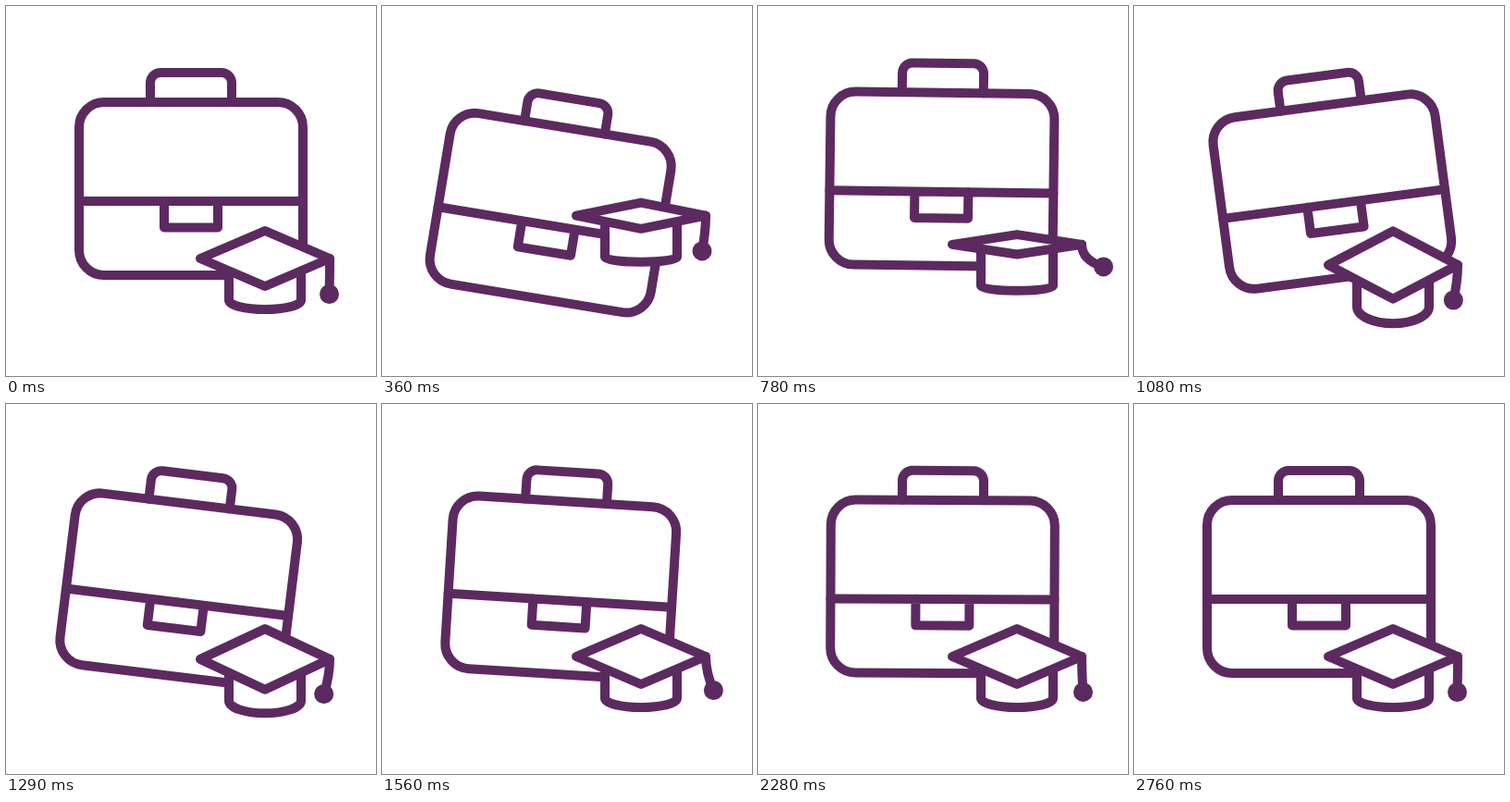
An HTML page for the animation above (4820 ms loop, 400 by 400 pixels).

```html
<!DOCTYPE html>
<html lang="en">
<head>
<meta charset="utf-8">
<title>Briefcase and graduation cap</title>
<style>
  html, body { margin: 0; width: 100%; height: 100%; overflow: hidden; background: #fff; }
  svg { display: block; width: 100vw; height: 100vh; }
  .lines { fill: none; stroke: #5c2a60; stroke-width: 10; stroke-linecap: round; stroke-linejoin: round; }
  .solid { fill: #fff; }
  .bead { fill: #5c2a60; stroke: none; }
</style>
</head>
<body>
<svg viewBox="0 0 400 400">
  <g class="lines">
    <g id="briefcase">
      <rect x="79" y="104" width="242" height="187" rx="27"/>
      <path d="M156 104V83a11 11 0 0 1 11-11h66a11 11 0 0 1 11 11v21M79 211H321M171 211v28.500h58V211"/>
    </g>
    <path id="base" class="solid"/>
    <path id="tassel"/>
    <path id="board" class="solid"/>
    <circle id="bead" class="bead" r="10.500"/>
  </g>
</svg>
<script>
const LOOP = 4820, STEP = 30;

// Each track is a list of [time in ms, value], eased between turning points.
const tracks = {
  caseAngle: [[0, 0], [530, 12.2], [1010, -9.3], [1350, 8.3], [1800, -2.3], [2200, 0.3], [2500, 0]],
  caseDrop: [[0, 0], [420, 29], [890, -16], [1110, 5], [1350, 4], [1700, 0]],
  capDrop: [[0, 0], [390, -47], [1090, 7], [1450, 0]],
  capTilt: [[0, 30], [640, 3.4], [1090, 36.7], [1450, 30]],
  swing: [[0, 0], [320, -4], [780, 24], [1180, -9], [1580, 9], [1980, -3], [2300, 2], [2560, -0.7], [2760, 0]]
};

function valueAt(track, time) {
  const next = track.findIndex(([at]) => at > time);
  if (next < 0) return track[track.length - 1][1];
  const [t0, v0] = track[next - 1], [t1, v1] = track[next];
  return v0 + (v1 - v0) * (1 - Math.cos(Math.PI * (time - t0) / (t1 - t0))) / 2;
}

const set = (id, attributes) => {
  const element = document.getElementById(id);
  for (const name in attributes) element.setAttribute(name, attributes[name]);
};

function draw(time) {
  const pose = {};
  for (const name in tracks) pose[name] = valueAt(tracks[name], time);

  set("briefcase", { transform: `translate(0 ${pose.caseDrop}) rotate(${pose.caseAngle} 200 88)` });

  const y = 273 + pose.capDrop, tilt = pose.capTilt;
  const belly = Math.max(5, tilt / 3 + Math.max(0, tilt - 30) * 0.9);
  set("base", { d: `M241 ${y}v45a39 ${belly} 0 0 0 78 0v-45` });
  set("board", { d: `M210 ${y}L280 ${y - tilt}L350 ${y}L280 ${y + tilt}Z` });

  const beadX = 349.5 + pose.swing, beadY = y + 38.5 - 0.025 * pose.swing ** 2;
  set("tassel", { d: `M350 ${y}Q350 ${y + 17} ${beadX} ${beadY}` });
  set("bead", { cx: beadX, cy: beadY });
}

const start = performance.now();
function tick() {
  const time = (performance.now() - start) % LOOP;
  draw(Math.floor(time / STEP) * STEP);
  requestAnimationFrame(tick);
}
tick();
</script>
</body>
</html>
```
